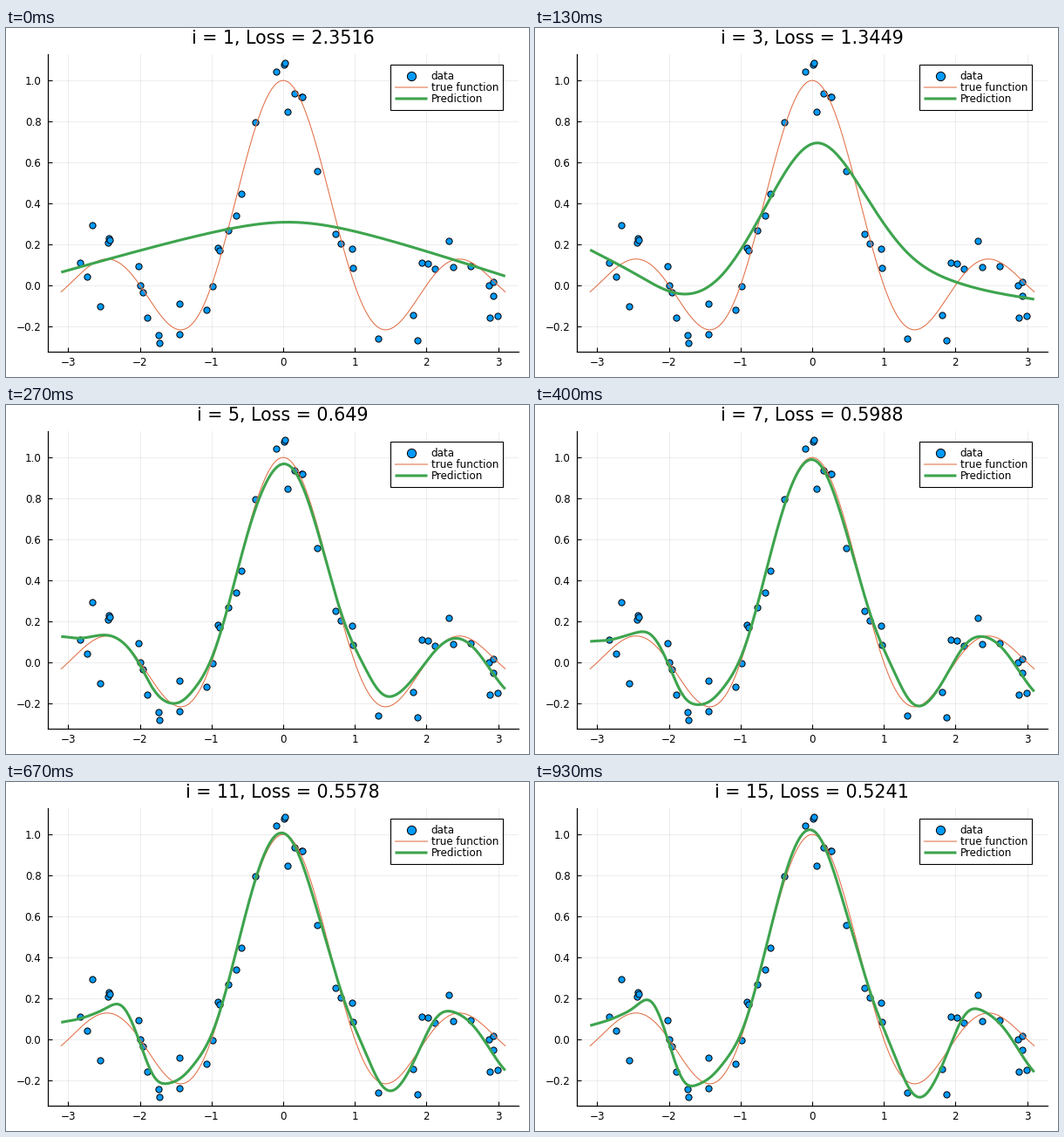
These frames come from a looping animation (600x400 px, 0.99 s). A matplotlib script:

```python
import numpy as np
import matplotlib.pyplot as plt
from matplotlib.animation import FuncAnimation
from matplotlib.patches import Rectangle

W, H, DPI = 600, 400, 100
BLUE, ORANGE, GREEN = "#009afa", "#e26f46", "#3ea44e"
SMALL, LARGE = 11.85, 20.7                     # text sizes in pixels
LEFT, RIGHT, TOP, BOTTOM = 48, 588, 30, 371
X_END = 3.1
TICK_MS, LOOP_MS, STEPS_PER_S = 10, 990, 15

plt.rcParams["font.family"] = "DejaVu Sans"

# noisy samples, as stage positions
SAMPLES = np.array([
    (85, 270), (92.5, 286), (99, 227), (107.5, 320), (117, 246.5),
    (118, 241.5), (118.5, 243.5), (152, 273.5), (153.5, 295.5), (157, 304),
    (162, 333), (174.5, 353), (175.5, 362), (199, 316.5), (199, 352),
    (230, 324), (237, 297), (243, 252.5), (245, 256), (255, 233),
    (264, 216), (270, 190.5), (285.5, 108.5), (310, 51), (319.5, 43),
    (320.5, 40.5), (323.5, 97), (331.5, 76), (339, 80), (340, 80),
    (357.5, 165), (378.5, 237), (384.5, 248), (397, 253.5), (398, 275.5),
    (427.5, 356.5), (467.5, 330), (472, 359), (477.5, 269.5), (484.5, 270.5),
    (492, 276.5), (508.5, 245), (513.5, 275), (533, 274), (554.5, 295.5),
    (555, 333), (559, 292), (559, 308), (564, 331)])
data_x = (SAMPLES[:, 0] - 318) / 82.17
data_y = (295.6 - SAMPLES[:, 1]) / 234.6


def pt(px):
    return px * 72 / DPI


def loss(i):
    """Exponential decay between a few known values."""
    known = {1: 2.3516, 3: 1.3449, 5: 0.649, 7: 0.5988,
             9: 0.5758, 11: 0.5578, 15: 0.5241}
    return round(float(np.exp(np.interp(i, list(known), np.log(list(known.values()))))), 4)


def spline(points, x):
    """Natural cubic spline through the points."""
    xk, yk = np.array(points).T
    n, h = len(xk), np.diff(xk)
    a, rhs = np.eye(n), np.zeros(n)
    for j in range(1, n - 1):
        a[j, j - 1:j + 2] = h[j - 1], 2 * (h[j - 1] + h[j]), h[j]
    rhs[1:-1] = 6 * np.diff(np.diff(yk) / h)
    m = np.linalg.solve(a, rhs)
    j = np.clip(np.searchsorted(xk, x) - 1, 0, n - 2)
    u, v, d = xk[j + 1] - x, x - xk[j], h[j]
    return ((m[j] * u**3 + m[j + 1] * v**3) / (6 * d)
            + (yk[j] / d - m[j] * d / 6) * u
            + (yk[j + 1] / d - m[j + 1] * d / 6) * v)


xs = np.linspace(-X_END, X_END, 400)


def first_fit(x):
    u = x - 0.13
    return 0.308 - 0.11 * (np.hypot(u, 0.918) - 0.918) - 0.0075 * u


def rough_fit(x):
    return spline([(-3.1, .173), (-2.45, .052), (-1.83, -.042), (-1.28, .043),
                   (-.66, .378), (.06, .695), (.73, .446), (1.29, .173),
                   (2, .017), (3.1, -.068)], x)


def close_fit(x, t):
    """The true function plus local errors: centre, width, height early and late."""
    y = np.sinc(x)
    for centre, width, early, late in [
            (-3.26, .29, .183, .115), (-2.25, .15, 0, .085),
            (-1.80, .15, -.034, -.098), (-1.24, .18, .047, .060),
            (-.15, .25, -.034, .034), (.41, .21, -.021, -.051),
            (1.12, .19, .085, .072), (1.53, .24, .034, -.081),
            (2.15, .17, 0, .064), (3.19, .36, -.102, -.132)]:
        y = y + (early + t * (late - early)) * np.exp(-((x - centre) / width)**2 / 2)
    return y


def progress(i, start, end):
    return (loss(start) - loss(i)) / (loss(start) - loss(end))


def prediction(i):
    if i >= 5:
        return close_fit(xs, progress(i, 5, 15))
    if i >= 3:
        t = progress(i, 3, 5)
        return (1 - t) * rough_fit(xs) + t * close_fit(xs, 0)
    t = progress(i, 1, 3)
    return (1 - t) * first_fit(xs) + t * rough_fit(xs)


fig = plt.figure(figsize=(W / DPI, H / DPI), dpi=DPI, facecolor="white")
ax = fig.add_axes([LEFT / W, 1 - BOTTOM / H, (RIGHT - LEFT) / W, (BOTTOM - TOP) / H])
ax.set_xlim(-1.06 * X_END, 1.06 * X_END)
ax.set_xticks(range(-3, 4))
ax.set_yticks(np.arange(-1, 6) / 5)
ax.set_axisbelow(True)
ax.grid(color="black", alpha=0.07, lw=pt(1))
ax.spines[["top", "right"]].set_visible(False)
ax.spines[["left", "bottom"]].set_linewidth(pt(1.2))
ax.tick_params(direction="in", length=pt(5), width=pt(1.1), labelsize=pt(SMALL))
ax.tick_params(axis="x", pad=pt(5.8))
ax.tick_params(axis="y", pad=pt(7.5))

dots = dict(ls="", marker="o", mfc=BLUE, mec="black", mew=pt(1))
thin = dict(color=ORANGE, lw=pt(1.05))
thick = dict(color=GREEN, lw=pt(3.1), solid_capstyle="butt")

ax.plot(data_x, data_y, ms=pt(7.2), zorder=3, **dots)
ax.plot(xs, np.sinc(xs), zorder=4, **thin)
fit_line, = ax.plot(xs, 0 * xs, zorder=5, **thick)

# title and legend are placed in stage pixels
page = fig.add_axes([0, 0, 1, 1])
page.set(xlim=(0, W), ylim=(H, 0))
page.axis("off")
title = page.text(317.7, 18.1, "", size=pt(LARGE), ha="center", va="baseline")
page.add_patch(Rectangle((441, 42), 129, 52, fc="white", ec="black", lw=pt(1.1)))
rows = 55, 68, 81
page.plot([465], [rows[0]], ms=pt(10.2), **dots)
page.plot([446.5, 483.5], [rows[1]] * 2, snap=False, **thin)
page.plot([446.5, 483.5], [rows[2]] * 2, snap=False, **thick)
for y, label in zip(rows, ("data", "true function", "Prediction")):
    page.text(487.7, y + 4.4, label, size=pt(SMALL), va="baseline")


def draw(tick):
    i = 1 + int((tick + 0.5) * TICK_MS * STEPS_PER_S / 1000)
    ys = prediction(i)
    fit_line.set_ydata(ys)
    lo, hi = min(data_y.min(), ys.min()), max(data_y.max(), ys.max())
    pad = 0.03 * (hi - lo)
    ax.set_ylim(lo - pad, hi + pad)
    title.set_text(f"i = {i}, Loss = {loss(i)}")
    return fit_line, title


anim = FuncAnimation(fig, draw, frames=LOOP_MS // TICK_MS, interval=TICK_MS,
                     repeat=True, repeat_delay=0, blit=False)
plt.show()
```
